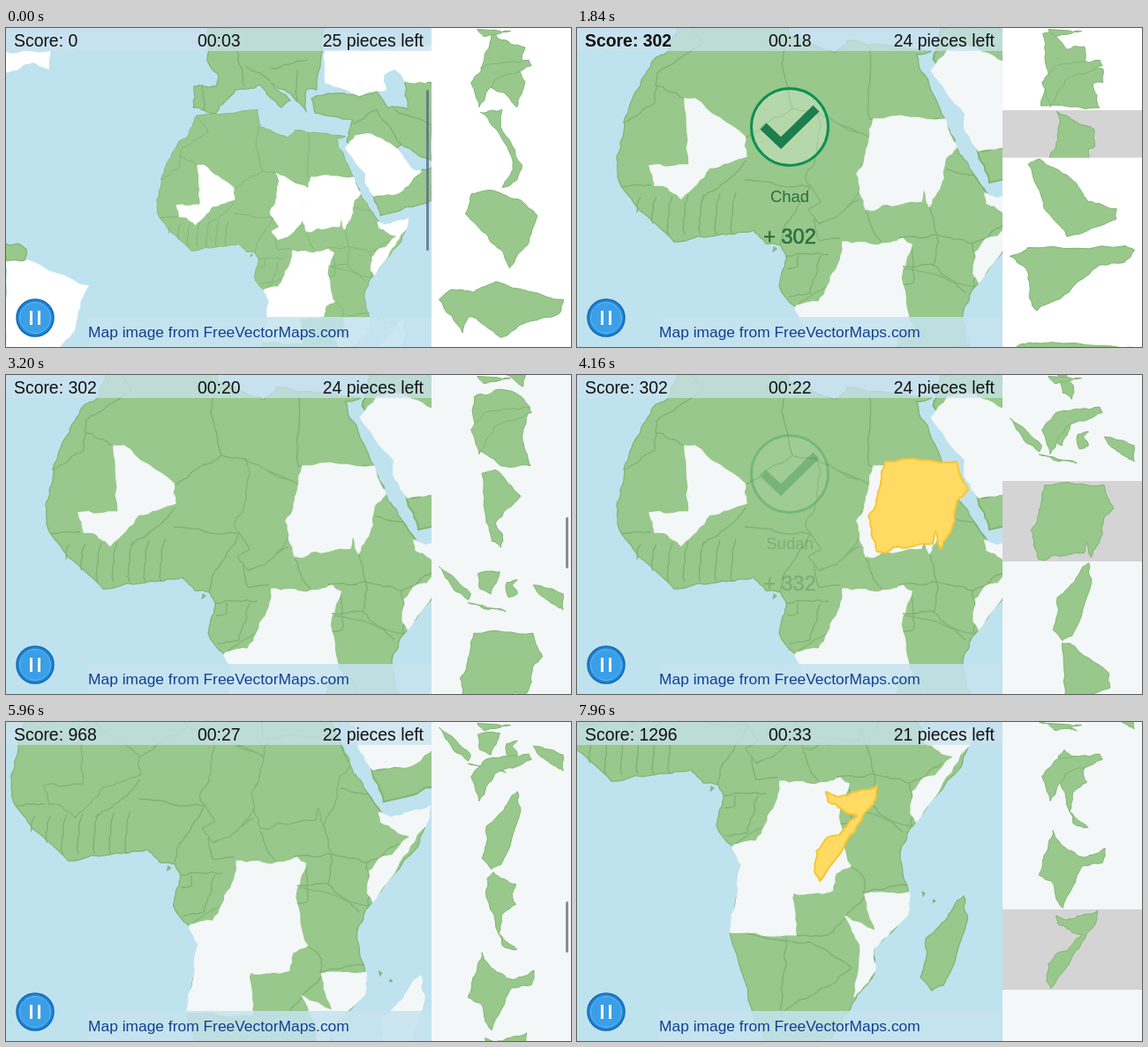
An HTML page that plays this animation: 640 px wide and 361 px high, repeating every 8000 ms.

```html
<!DOCTYPE html>
<html lang="en">
<head>
<meta charset="utf-8">
<title>Map puzzle</title>
<style>
html, body { margin: 0; width: 100%; height: 100%; overflow: hidden; background: #fff; }
svg { display: block; }
path { stroke-linejoin: round; }
text { font-family: "Liberation Sans", Arial, sans-serif; }
.land { fill: #98c88b; stroke: #83b676; stroke-width: 1.3; }
.border { fill: none; stroke: #7fb273; stroke-width: 1.3; }
.empty { fill: var(--empty); stroke: var(--empty); stroke-width: 1.5; }
.drag { fill: #ffdb63; stroke: #f8c536; stroke-width: 2; }
.head { font-size: 19.4px; fill: #111; }
.popup text { fill: #2b6e40; text-anchor: middle; }
</style>
</head>
<body>
<svg id="stage" width="640" height="361" viewBox="0 0 640 361"></svg>
<script>
const LOOP = 8000, ROW = 91, VIEW = 361;
const stage = document.getElementById('stage');

function add(parent, tag, attrs = {}, text) {
  const el = document.createElementNS('http://www.w3.org/2000/svg', tag);
  set(el, attrs);
  if (text) el.textContent = text;
  parent.appendChild(el);
  return el;
}
function set(el, attrs) {
  for (const name in attrs) el.setAttribute(name, attrs[name]);
}
const show = (el, on) => set(el, { visibility: on ? 'visible' : 'hidden' });

// Progress of a phase from 0 to 1
const ramp = (t, start, end) => Math.min(1, Math.max(0, (t - start) / (end - start)));
const ease = k => k * k * (3 - 2 * k);
const mix = (a, b, k) => a + (b - a) * k;

function random(seed) {
  return () => (seed = seed * 16807 % 2147483647) / 2147483647 - .5;
}

// Turns a few key points into a ragged line; "/" separates parts
function ragged(points, close = 'z') {
  const jitter = random(points.length * 7919 + 17);
  const split = (a, b, depth) => {
    const dx = b[0] - a[0], dy = b[1] - a[1], length = Math.hypot(dx, dy);
    if (!depth || length < 5) return [b];
    const push = jitter() * Math.min(.24, 4 / length);
    const mid = [(a[0] + b[0]) / 2 - dy * push, (a[1] + b[1]) / 2 + dx * push];
    return [...split(a, mid, depth - 1), ...split(mid, b, depth - 1)];
  };
  return points.split('/').map(part => {
    const keys = part.trim().split(' ').map(p => p.split(',').map(Number));
    if (close) keys.push(keys[0]);
    const line = keys.slice(1).flatMap((p, i) => split(keys[i], p, 3));
    return 'M' + [keys[0], ...line].map(p => p.map(v => v.toFixed(1))).join(' ') + close;
  }).join('');
}
const shape = (parent, points, cls = 'land') => add(parent, 'path', { d: ragged(points), class: cls });
const borders = (parent, points) => add(parent, 'path', { d: ragged(points, ''), class: 'border' });

// Pieces in play: dragged by offsets from -> to during move, placed at drop
const plays = [
  { name: 'Chad', points: 302, select: 880, move: [1240, 1600], drop: 1640, origin: [54, 0], from: [-54, 0], to: [4, -3],
    key: '216,95 277,124 278,152 268,155 270,180 238,215 220,221 208,205 222,198 205,168 218,142 222,112' },
  { name: 'Sudan', points: 332, select: 3720, move: [3740, 4100], drop: 4120, origin: [0, 0], from: [-132, 25], to: [13, -5],
    key: '336,103 331,126 326,150 317,165 327,205 337,206 345,200 390,196 393,182 399,202 415,170 417,148 430,135 417,103' },
  { name: 'Mali', points: 334, select: 4720, move: [4740, 5080], drop: 5120, origin: [0, 0], from: [104, 44], to: [4, 3],
    key: '122,80 133,80 190,123 192,145 150,158 118,193 102,180 88,178 82,156 127,155' },
  { name: 'Madagascar', points: 328, select: 6440, move: [6440, 6680], drop: 7280, origin: [79, 188], from: [-166, -58], to: [5, -4],
    key: '430,184 434,212 407,285 394,291 381,276 388,252 387,232 409,212' },
  { select: 7600, move: [7800, 7960], drop: Infinity, origin: [180, 108], from: [-135, 80], to: [-109, 67],
    key: '340,72 338,87 305,135 275,180 269,170 271,146 282,132 297,128 318,106 284,90 282,79 295,85' }
];
const [chad, sudan, mali, madagascar, somalia] = plays;
const scored = plays.filter(p => p.points);

// Side list, top to bottom
const list = [
  '552,2 556,12 586,22 580,45 586,60 577,88 562,72 533,60 541,30',
  '538,97 562,94 560,112 584,155 578,172 562,180 574,160 572,145 548,108',
  '546,184 580,194 601,212 590,245 570,270 563,252 540,230 521,210 528,188',
  '492,303 505,292 530,295 555,283 630,303 626,318 585,330 560,345 540,330 525,322 518,340',
  '529,8 540,5 555,25 575,22 577,45 596,47 596,62 585,63 592,90 527,88 535,50',
  chad,
  '512,190 525,184 560,206 580,232 612,240 612,252 556,272 543,255 530,240',
  '490,293 510,283 620,281 630,286 618,300 590,303 560,328 520,354 512,340 510,310',
  '497,190 508,181 530,180 630,184 632,192 615,195 625,210 600,203 580,214 530,208 515,213',
  '545,252 558,243 566,256 578,262 568,275 588,310 586,331 555,308 534,265',
  '537,340 560,334 577,340 585,350 578,375 585,400 560,400 540,385',
  '545,-55 560,-59 588,-30 560,0 568,12 566,27 556,20 550,0',
  '489,47 525,78 522,85 505,72 / 522,88 565,98 545,96 / 533,55 558,53 548,78 535,72 / 566,65 578,62 572,68 578,78 568,82 / 596,68 630,78 630,96 608,82',
  sudan, madagascar, mali,
  '545,128 552,121 578,135 574,150 578,158 562,170 558,192 579,210 562,205 544,150',
  '540,212 548,226 575,242 598,232 595,248 572,252 551,298 538,268 525,262 530,240',
  somalia,
  '543,306 580,308 550,314 / 536,365 555,345 600,340 603,346 562,362 545,392'
];

// Map: wide surroundings, then Africa at full zoom
add(add(add(stage, 'defs'), 'clipPath', { id: 'view' }), 'rect', { width: 482, height: VIEW });
add(stage, 'rect', { width: 482, height: VIEW, fill: '#bfe2ef' });
const map = add(add(stage, 'g', { 'clip-path': 'url(#view)' }), 'g');
const world = add(map, 'g', { transform: 'translate(-239.7 -178.3) scale(1.6667)' });
shape(world, '228,0 360,0 352,70 340,70 340,95 318,72 300,62 322,82 312,90 288,64 260,70 238,96 212,90 213,66 238,66 240,52 228,36');
shape(world, '346,80 372,74 400,78 420,72 432,90 455,92 452,60 462,56 482,62 482,150 448,132 440,138 395,140 386,128 393,104 350,96');
shape(world, '416,190 445,184 472,160 482,158 482,195 424,212');
shape(world, '396,122 412,120 440,135 460,160 470,162 445,186 417,190 409,178 408,165 395,150 385,136', 'empty');
shape(world, '362,26 482,20 482,60 452,60 440,46 428,52 430,70 400,76 362,62', 'empty');
shape(world, '0,28 50,27 48,46 30,38 0,50 / 0,263 22,262 93,292 78,340 60,361 0,361', 'empty');
shape(world, '0,244 14,244 23,250 22,262 0,263');
borders(world, '222,66 224,94 / 262,26 270,66 / 272,44 300,60 / 300,46 342,36 / 330,48 330,82 / 393,108 420,92 448,132 / 440,92 482,110');

shape(map, '120,-13 236,-24 240,8 292,28 306,14 402,26 384,30 393,52 417,103 430,135 447,162 470,196 518,182 506,226 451,293 434,330 300,312 247,316 229,292 237,262 231,246 214,244 200,229 165,233 110,242 70,206 47,172 48,140 55,100 72,65 84,40 103,27');
const south = add(map, 'g', { transform: 'translate(79 188)' });
shape(south, '168,128 178,150 165,225 195,327 215,365 280,345 308,300 330,268 328,243 367,205 366,172 358,132 371,105 300,85 230,85');
shape(south, '144,60 147,62 143,65 / 383,179 386,181 384,184 / 396,188 398,190 395,191');
borders(map, '120,-14 142,18 90,52 88,85 52,107 / 88,64 122,80 / 192,124 244,91 232,40 238,8 / 244,91 270,94 331,124 / 331,20 331,103 417,103 / 192,150 176,168 141,192 / 84,178 50,180');
borders(map, '190,172 264,180 236,222 230,245 / 268,205 274,240 298,238 / 237,258 285,256 / 274,222 320,194 / 327,208 345,242 / 399,202 408,234 448,244 484,222');
borders(map, '365,237 408,234 404,268 440,300 / 418,160 450,166 468,194 / 448,244 450,293 / 250,258 250,270 238,272 / 276,258 264,300 240,304 / 369,270 404,268');
borders(south, '288,102 302,100 300,57 / 302,150 318,165 316,180 366,172 / 240,228 276,228 296,207 318,184 / 229,230 229,262 222,318 284,282 303,265 / 165,225 256,236 303,265');
for (let x = 180; x > 70; x -= 18) {
  borders(map, `${x},${186 + (180 - x) / 18} ${x - 4},${234 - Math.max(0, 108 - x) * .7}`);
}
shape(south, '168,128 195,122 215,85 222,54 262,58 290,50 300,57 288,95 302,150 285,158 281,178 237,180 240,228 165,225 178,150', 'empty');
shape(south, '318,182 368,180 367,205 328,243 330,268 306,298 313,240 296,207 330,224', 'empty');

for (const p of plays) {
  p.hole = shape(map, p.key);
  set(p.hole, { transform: `translate(${p.origin})` });
}
for (const p of plays) p.drag = shape(map, p.key, 'drag');

// Overlays
add(stage, 'rect', { width: 482, height: 26, fill: '#c9e3ee', opacity: .76 });
add(stage, 'rect', { x: 93, y: 327, width: 389, height: 34, fill: '#c5e3ef', opacity: .86 });
const edgeBar = add(stage, 'rect', { x: 476, y: 70, width: 3, height: 182, rx: 1.5, fill: '#5d6a85', opacity: .8 });
const score = add(stage, 'text', { x: 9, y: 21, class: 'head' });
const clock = add(stage, 'text', { x: 217, y: 21, class: 'head' });
const left = add(stage, 'text', { x: 473, y: 21, class: 'head', 'text-anchor': 'end' });
add(stage, 'text', { x: 93, y: 350, 'font-size': 17.4, fill: '#123f8f' }, 'Map image from FreeVectorMaps.com');
add(stage, 'circle', { cx: 33, cy: 328, r: 21, fill: '#1f86d8', stroke: '#1668ad', 'stroke-width': 1.5 });
add(stage, 'circle', { cx: 33, cy: 328, r: 17.5, fill: '#3b9fe8', stroke: '#69bbf2' });
for (const x of [27, 36]) add(stage, 'rect', { x, y: 320, width: 3, height: 16, fill: '#fff' });

const popup = add(stage, 'g', { class: 'popup' });
add(popup, 'circle', { cx: 241, cy: 112, r: 43.5, fill: '#fff', 'fill-opacity': .28, stroke: '#0f9055', 'stroke-width': 3 });
add(popup, 'path', { d: 'M211,111 231,130 271,91', fill: 'none', stroke: '#1d7d4c', 'stroke-width': 10, style: 'stroke-linejoin:miter' });
const popName = add(popup, 'text', { x: 241, y: 197, 'font-size': 18.5 });
const popPoints = add(popup, 'text', { x: 241, y: 244, 'font-size': 23.5, stroke: '#2b6e40', 'stroke-width': .6 });

// Side panel
const panel = add(stage, 'rect', { x: 482, width: 158, height: VIEW });
const rows = list.map(item => {
  const play = item.key ? item : null;
  const box = add(stage, 'svg', { x: 482, width: 158, height: ROW, overflow: 'hidden' });
  const back = add(box, 'rect', { width: 158, height: ROW, fill: '#d4d4d4' });
  const piece = shape(box, play ? play.key : item);
  const b = piece.getBBox(), fit = Math.min(141 / b.width, 88 / b.height);
  set(piece, {
    transform: `translate(79 45.5) scale(${fit}) translate(${-b.x - b.width / 2} ${-b.y - b.height / 2})`,
    style: `stroke-width:${1 / fit}`
  });
  return { box, back, play };
});
const scrollBar = add(stage, 'rect', { x: 634, width: 3, height: 58, rx: 1.5, fill: '#8c8c8c' });

const scrolls = [[400, 860, 362], [2360, 3520, 610], [5600, 6360, 90]];
const pans = [[4720, 5100, -7, 0], [5600, 6400, -72, -188], [7800, 7960, 8, 13]];
const ticks = [[0, 3], [400, 5], [900, 17], [2600, 19.5], [5360, 25.5], [6680, 30.5], [LOOP, 33.6]];

function drawMap(t) {
  const out = 1 - (ramp(t, 40, 240) * .45 + ramp(t, 400, 880) * .55);
  let x = 143.8 * out, y = 107 * out;
  for (const [start, end, dx, dy] of pans) {
    x += dx * ramp(t, start, end);
    y += dy * ramp(t, start, end);
  }
  set(map, { transform: `translate(${x} ${y}) scale(${1 - .4 * out})` });
  stage.style.setProperty('--empty', t < 400 ? '#fff' : '#f4f7f7');
  show(edgeBar, t < 400);

  for (const p of plays) {
    const placed = t >= p.drop + 80, k = ease(ramp(t, ...p.move));
    const [dx, dy] = p.from.map((v, i) => p.origin[i] + mix(v, p.to[i], k));
    set(p.hole, { class: placed ? 'land' : 'empty' });
    set(p.drag, { transform: `translate(${dx} ${dy})` });
    show(p.drag, t >= p.select && !placed);
  }
}

function drawHead(t) {
  const done = scored.filter(p => t >= p.drop + 100), last = done[done.length - 1];
  score.textContent = 'Score: ' + done.reduce((sum, p) => sum + p.points, 0);
  set(score, { 'font-weight': last && t < last.drop + 360 ? 'bold' : 'normal' });
  left.textContent = 25 - done.length + ' pieces left';

  const i = ticks.findIndex(([time]) => time > t);
  const [[t0, a], [t1, b]] = [ticks[i - 1], ticks[i]];
  clock.textContent = '00:' + String(Math.floor(mix(a, b, ramp(t, t0, t1)))).padStart(2, '0');

  const shown = scored.find(p => t >= p.drop && t < p.drop + 400);
  show(popup, shown);
  if (!shown) return;
  popName.textContent = shown.name;
  popPoints.textContent = '+ ' + shown.points;
  const age = t - shown.drop;
  set(popup, { opacity: ramp(age, 0, 160) * (1 - ramp(age, 260, 400)) });
}

function drawPanel(t) {
  const offset = scrolls.reduce((sum, [start, end, by]) => sum + by * ramp(t, start, end), 0);
  set(panel, { fill: t < 2360 ? '#fff' : '#f4f7f7' });
  let top = -offset;
  for (const { box, back, play } of rows) {
    const height = play ? ROW * (1 - ramp(t, play.drop + 160, play.drop + 260)) : ROW;
    const visible = height > 0 && top < VIEW && top + height > 0;
    set(box, { y: top, height, display: visible ? 'inline' : 'none' });
    show(back, play && t >= play.select);
    top += height;
  }
  set(scrollBar, { y: offset * .2 });
  show(scrollBar, scrolls.some(([start, end]) => t > start && t < end));
}

function tick() {
  const t = performance.now() % LOOP;
  drawMap(t);
  drawHead(t);
  drawPanel(t);
  requestAnimationFrame(tick);
}
tick();
</script>
</body>
</html>
```
